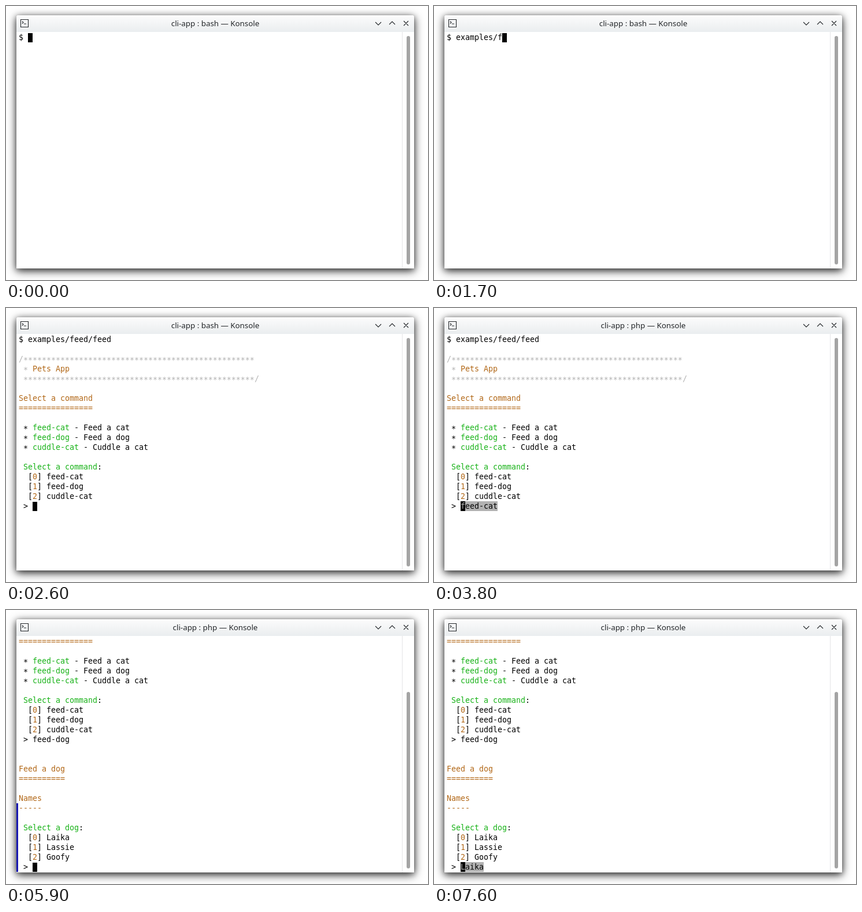
An HTML page for the animation above (8000 ms loop, 730 by 475 pixels).

```html
<!DOCTYPE html>
<html lang="en">
<head>
<meta charset="utf-8">
<title>Terminal session</title>
<style>
  html, body { margin: 0; width: 100%; height: 100%; overflow: hidden; background: #fff; }
  .window {
    position: absolute; left: 18px; top: 16px; width: 688px; height: 439px;
    border-radius: 3px 3px 0 0; background: #fff;
    box-shadow: 0 0 1px rgba(0,0,0,.4), 0 4px 16px rgba(0,0,0,.8), 0 2px 8px rgba(0,0,0,.3);
  }
  .bar { height: 29px; border-radius: 3px 3px 0 0; background: linear-gradient(#fcfcfc, #eaedef); }
  svg { position: absolute; left: 0; top: 0; }
  #title { font: 13.333px "Noto Sans", sans-serif; fill: #232629; }
  #screen text { font: 13.29px "DejaVu Sans Mono", monospace; white-space: pre; }
  .icon { fill: none; stroke: #232629; stroke-width: 1.1; }
</style>
</head>
<body>
<div class="window"><div class="bar"></div></div>
<svg width="730" height="475" viewBox="0 0 730 475">
  <g class="icon">
    <path d="M25.5 23.5h13v13h-13z"/>
    <path d="M28 26.5l2 2-2 2M31 31h4"/>
    <path d="M639 28l5 5 5-5M663 32l5-5 5 5M688 26l8 8M696 26l-8 8"/>
  </g>
  <text id="title" x="362" y="35" text-anchor="middle"></text>
  <path d="M685.5 45V455" stroke="#e4e5e6"/>
  <rect id="thumb" x="693" width="6" rx="3" fill="#a4a4a4"/>
  <g id="screen"></g>
</svg>
<script>
const LOOP = 8000, CELL = 8, ROW = 17, LEFT = 22, TOP = 46;
const COLORS = { k: '#000', g: '#18b218', o: '#b26818', s: '#b2b2b2' };
const stars = '*'.repeat(50);

// "~" plus a letter switches the text colour
const menu = [
  '$ examples/feed/feed', '',
  '~s/' + stars, '~s * ~oPets App', '~s ' + stars + '/', '',
  '~oSelect a command', '~o' + '='.repeat(16), '',
  ' * ~gfeed-cat~k - Feed a cat',
  ' * ~gfeed-dog~k - Feed a dog',
  ' * ~gcuddle-cat~k - Cuddle a cat', '',
  ' ~gSelect a command~k:',
  '  [~o0~k] feed-cat', '  [~o1~k] feed-dog', '  [~o2~k] cuddle-cat', ' > '
];
const dogs = [
  ...menu.slice(0, -1), ' > feed-dog', '', '',
  '~oFeed a dog', '~o' + '='.repeat(10), '',
  '~oNames', '~o-----', '',
  ' ~gSelect a dog~k:',
  '  [~o0~k] Laika', '  [~o1~k] Lassie', '  [~o2~k] Goofy', ' > '
];

const typed = text => ({ lines: ['$ ' + text] });
const steps = [
  [0, { ...typed(''), title: 'bash', choice: '', marker: false }],
  [700, typed('e')],
  [800, typed('ex')],
  [900, typed('exa')],
  [1100, typed('exam')],
  [1300, typed('examples/')],
  [1700, typed('examples/f')],
  [2000, typed('examples/feed/')],
  [2100, typed('examples/feed/feed ')],
  [2600, { lines: menu }],
  [3100, { title: 'php' }],
  [3800, { choice: 'feed-cat' }],
  [4900, { choice: 'feed-dog' }],
  [5900, { lines: dogs, choice: '', marker: true }],
  [6200, { marker: false }],
  [7600, { choice: 'Laika' }]
];

const byId = id => document.getElementById(id);
const screen = byId('screen'), title = byId('title'), thumb = byId('thumb');

function add(tag, attrs, text = '') {
  const node = document.createElementNS('http://www.w3.org/2000/svg', tag);
  for (const key in attrs) node.setAttribute(key, attrs[key]);
  node.textContent = text;
  screen.append(node);
}
const box = (x, y, width, height, fill) => add('rect', { x, y, width, height, fill });

// Returns the column after the text; asterisks sit mid-line
function write(text, col, row, fill) {
  for (const part of text.split(/(\*+)/)) {
    const y = TOP + row * ROW + (part[0] === '*' ? 15 : 13);
    if (part.trim()) add('text', { x: LEFT + col * CELL, y, fill }, part);
    col += part.length;
  }
  return col;
}

function writeLine(line, row) {
  return ('~k' + line).split('~').slice(1)
    .reduce((col, run) => write(run.slice(1), col, row, COLORS[run[0]]), 0);
}

function draw({ lines, title: program, choice, marker }) {
  const scrolled = lines.length > 24;
  const visible = lines.slice(-24);
  const row = visible.length - 1;
  screen.replaceChildren();
  title.textContent = `cli-app : ${program} — Konsole`;
  thumb.setAttribute('y', scrolled ? 142 : 52);
  thumb.setAttribute('height', scrolled ? 306 : 396);

  let col = 0;
  visible.forEach((line, i) => { col = writeLine(line, i); });
  const x = LEFT + col * CELL, y = TOP + row * ROW;
  if (choice) {
    box(x, y, choice.length * CELL, ROW, COLORS.s);
    write(choice.slice(1), col + 1, row, COLORS.k);
  }
  box(x, choice ? y : y + 1, CELL, choice ? ROW : ROW - 1, COLORS.k);
  if (choice) write(choice[0], col, row, COLORS.s);
  if (marker) box(18, 335, 3, 119, '#1818b2');
}

let shown = -1;
function tick() {
  const time = performance.now() % LOOP;
  const index = steps.findLastIndex(([start]) => start <= time);
  if (index !== shown) {
    shown = index;
    draw(Object.assign({}, ...steps.slice(0, index + 1).map(([, change]) => change)));
  }
  requestAnimationFrame(tick);
}
tick();
</script>
</body>
</html>
```
